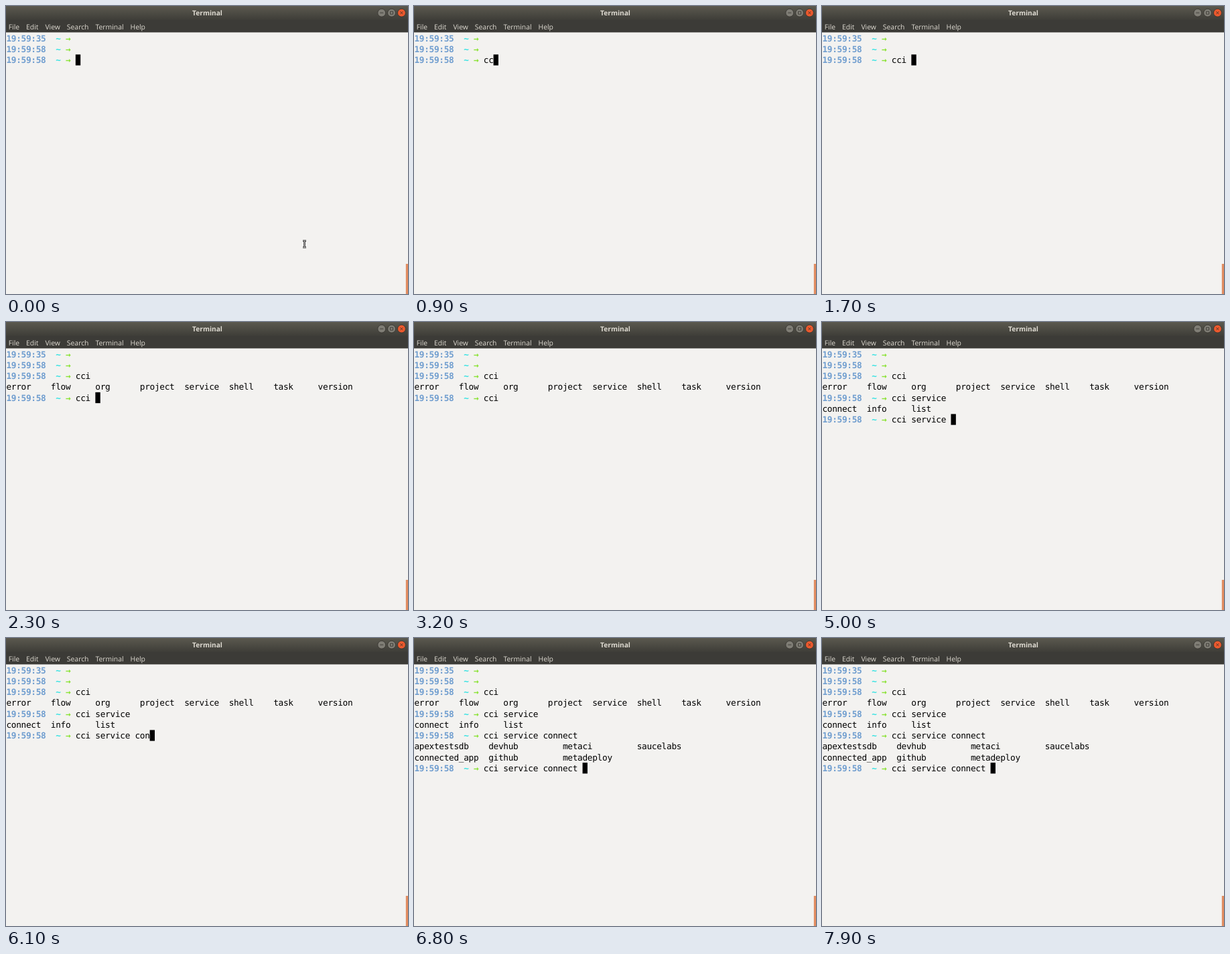
Animation, 600 px wide and 430 px high, one loop 8 s. Source, as an HTML page:

```html
<!DOCTYPE html>
<html lang="en">
<head>
<meta charset="utf-8">
<title>Terminal</title>
<style>
  html, body { margin: 0; width: 100%; height: 100%; overflow: hidden; background: #f3f2f0; }
  svg { display: block; width: 600px; height: 430px; }
  text { white-space: pre; text-rendering: geometricPrecision; }
  .ui { font: 10.4px "Open Sans", "Noto Sans", sans-serif; fill: #dfdbd2; }
  .title { font-size: 10.2px; font-weight: 700; text-anchor: middle; }
  .mono { font: 12.8px "DejaVu Sans Mono", monospace; letter-spacing: -.32px; }
  .mono tspan { font-weight: bold; }
  .time { fill: #6f9dcf; }
  .path { fill: #34e2e2; }
  .arrow { fill: #8ae234; }
  .outline { stroke: #1c1c1c; stroke-width: 2.4; }
  .core { stroke: #e8e7e5; stroke-width: .7; }
</style>
</head>
<body>
<svg viewBox="0 0 600 430">
  <defs>
    <linearGradient id="bar" x2="0" y2="1">
      <stop stop-color="#5b594f"/>
      <stop offset="1" stop-color="#3e3d38"/>
    </linearGradient>
    <path id="beam" fill="none" d="M443 350.8h5M445.5 350.8v9.6M443 360.4h5"/>
  </defs>
  <rect width="600" height="430" fill="#f3f2f0"/>
  <rect width="600" height="39.4" fill="#3c3b37"/>
  <rect width="600" height="21" fill="url(#bar)"/>
  <text class="ui title" x="300.5" y="14">Terminal</text>
  <text class="ui" id="menu" x="3.7" y="34.6"></text>
  <g id="buttons" stroke="#33322d" stroke-width=".8"></g>
  <rect x="596.8" y="385" width="3.2" height="45" fill="#e18c60"/>
  <g id="rows"></g>
  <rect id="cursor"/>
  <g id="pointer"><use href="#beam" class="outline"/><use href="#beam" class="core"/></g>
</svg>
<script>
const LOOP = 8000, BLINK = 600;
const CELL = 7.387, LINE = 16.25, LEFT = .4, TOP = 39.9, BASELINE = 12.6;
const PROMPT_COLS = 14, SCREEN_COLS = 81;
const $ = id => document.getElementById(id);

const prompt = time =>
  `<tspan class="time">${time}</tspan>  <tspan class="path">~</tspan> <tspan class="arrow">→</tspan> `;
const PROMPT = prompt('19:59:58');

// Completions for each command, in the order they are listed.
const completions = {
  'cci ': 'error flow org project service shell task version',
  'cci service ': 'connect info list',
  'cci service connect ': 'apextestsdb connected_app devhub github metaci metadeploy saucelabs'
};

// Key presses: \t is a silent tab, \n prints the completions.
const keys = [
  [-100, '\t'], [900, 'cc'], [1500, 'i'], [1700, ' '], [2100, '\t'], [2300, '\n'],
  [3300, 'se'], [3500, 'r'], [3900, '\t'], [4200, 'vice '], [4600, '\t'], [5000, '\t\n'],
  [5700, 'c'], [5800, 'o'], [6100, 'n'], [6400, 'nect '], [6700, '\t\n']
];

// Lay words out column by column, as the shell does.
function listing(text) {
  const words = text.split(' ');
  const width = Math.max(...words.map(w => w.length)) + 2;
  const count = Math.ceil(words.length / Math.floor(SCREEN_COLS / width));
  return Array.from({ length: count }, (_, row) =>
    words.filter((_, i) => i % count === row).map(w => w.padEnd(width)).join(''));
}

function screenAt(t) {
  const lines = [prompt('19:59:35'), PROMPT];
  let command = '', pressed = 0;
  for (const [time, text] of keys) {
    if (time > t) break;
    if (text !== '\n') pressed = time;
    if (text.includes('\n')) lines.push(PROMPT + command, ...listing(completions[command]));
    command += text.trimStart() || (text === ' ' ? text : '');
  }
  lines.push(PROMPT + command);
  return { lines, command, lit: Math.floor((t - pressed) / BLINK) % 2 === 0 };
}

const setAttrs = (el, attrs) => Object.entries(attrs).forEach(([k, v]) => el.setAttribute(k, v));
const show = (el, on) => el.style.display = on ? '' : 'none';

$('menu').innerHTML = ['File', 'Edit', 'View', 'Search', 'Terminal', 'Help']
  .map((label, i) => `<tspan dx="${i && 9.9}">${label}</tspan>`).join('');

$('buttons').innerHTML = ['M-2.5 0h5', 'M-2-2h4v4h-4z', 'M-2-2l4 4m0-4l-4 4'].map((icon, i) =>
  `<g transform="translate(${560.7 + 14.85 * i} 10.2)">
    <circle r="5.9" fill="${i < 2 ? '#7f7d75' : '#ee5a2e'}"/><path fill="none" d="${icon}"/></g>`).join('');

let drawn = '';
function frame() {
  const t = performance.now() % LOOP;
  const { lines, command, lit } = screenAt(t);
  const markup = lines.map((line, i) =>
    `<text class="mono" x="${LEFT}" y="${TOP + i * LINE + BASELINE}">${line}</text>`).join('');
  if (markup !== drawn) $('rows').innerHTML = drawn = markup;
  setAttrs($('cursor'), {
    x: LEFT + (PROMPT_COLS + command.length) * CELL,
    y: TOP + (lines.length - 1) * LINE,
    width: CELL, height: LINE
  });
  show($('cursor'), lit);
  show($('pointer'), !command);
  requestAnimationFrame(frame);
}
frame();
</script>
</body>
</html>
```
